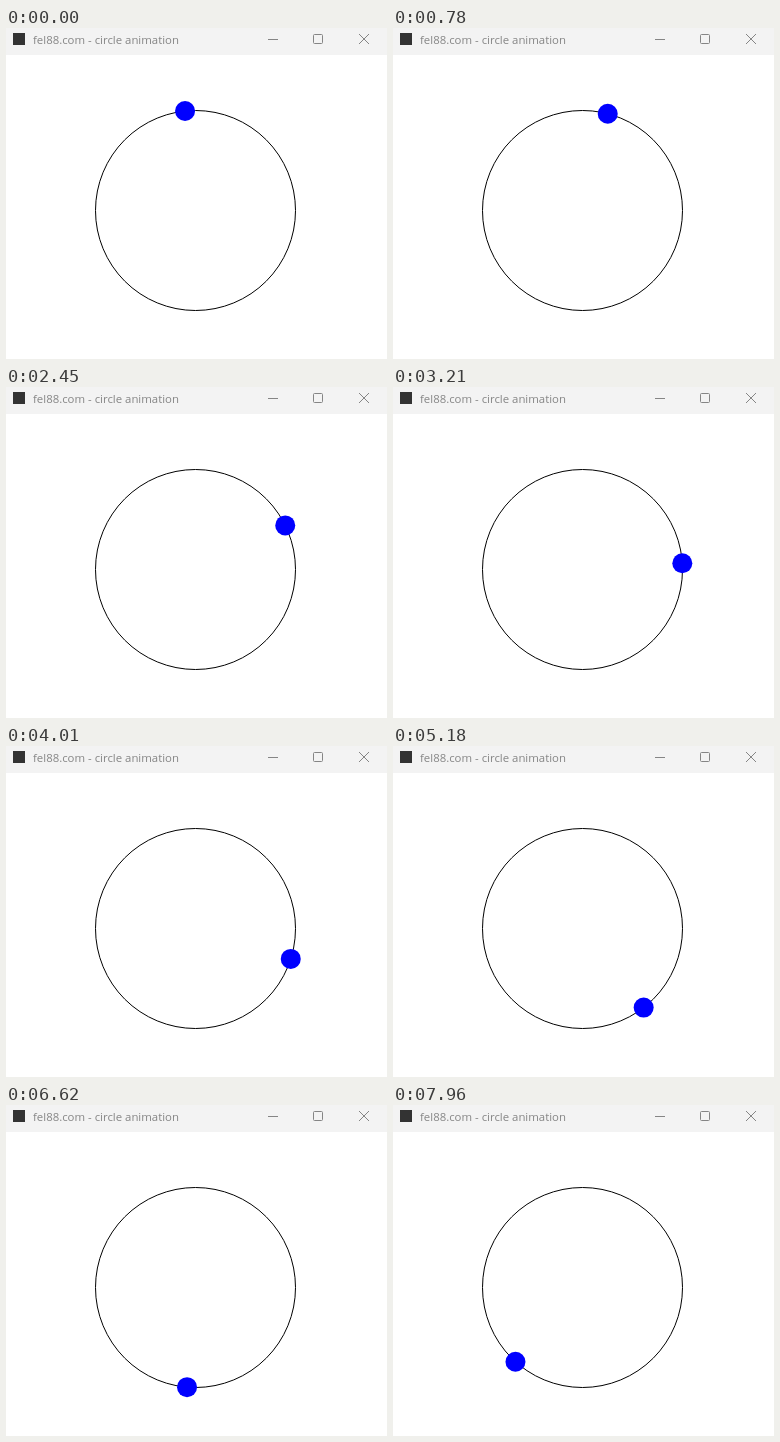
Write an HTML page that moves like this. It is 381 by 331 pixels and loops after 7990 ms.

```html
<!DOCTYPE html>
<html lang="en">
<head>
<meta charset="utf-8">
<title>Circle animation</title>
<style>
  html, body { margin: 0; width: 100%; height: 100%; overflow: hidden; background: #fff; }
  svg { display: block; width: 100%; height: 100%; }
  text { font: 11.4px "Open Sans", "Noto Sans", sans-serif; fill: #858585; }
  .buttons { fill: none; stroke: #858585; }
</style>
</head>
<body>
<svg viewBox="0 0 381 331">
  <rect width="381" height="27" fill="#f3f3f3"/>
  <rect x="7" y="5" width="12" height="12" fill="#333"/>
  <text x="27" y="16">fel88.com - circle animation</text>
  <g class="buttons">
    <path d="M262 11.5h10"/>
    <rect x="307.5" y="6.5" width="9" height="9" rx="1"/>
    <path d="M353 6l10 10M363 6l-10 10"/>
  </g>
  <circle cx="189.5" cy="182.5" r="100" fill="none" stroke="#000"/>
  <circle id="dot" r="10" fill="#00f"/>
</svg>
<script>
  const LOOP = 7990;
  const STEP_MS = 22.51;
  const STEP_DEG = 0.665;
  const START_DEG = -6;
  // Runs of steady steps, separated by short pauses
  const runs = [
    { start: 100, steps: 143 },
    { start: 3400, steps: 144 },
    { start: 6720, steps: 56 }
  ];
  const dot = document.getElementById("dot");

  function stepsAt(t) {
    return runs.reduce((sum, { start, steps }) => {
      const done = Math.floor((t - start) / STEP_MS) + 1;
      return sum + Math.min(steps, Math.max(0, done));
    }, 0);
  }

  function draw(t) {
    const angle = (START_DEG + stepsAt(t) * STEP_DEG) * Math.PI / 180;
    dot.setAttribute("cx", 189.5 + 100 * Math.sin(angle));
    dot.setAttribute("cy", 182.5 - 100 * Math.cos(angle));
  }

  const begin = performance.now();
  function tick() {
    draw((performance.now() - begin) % LOOP);
    requestAnimationFrame(tick);
  }
  tick();
</script>
</body>
</html>
```
